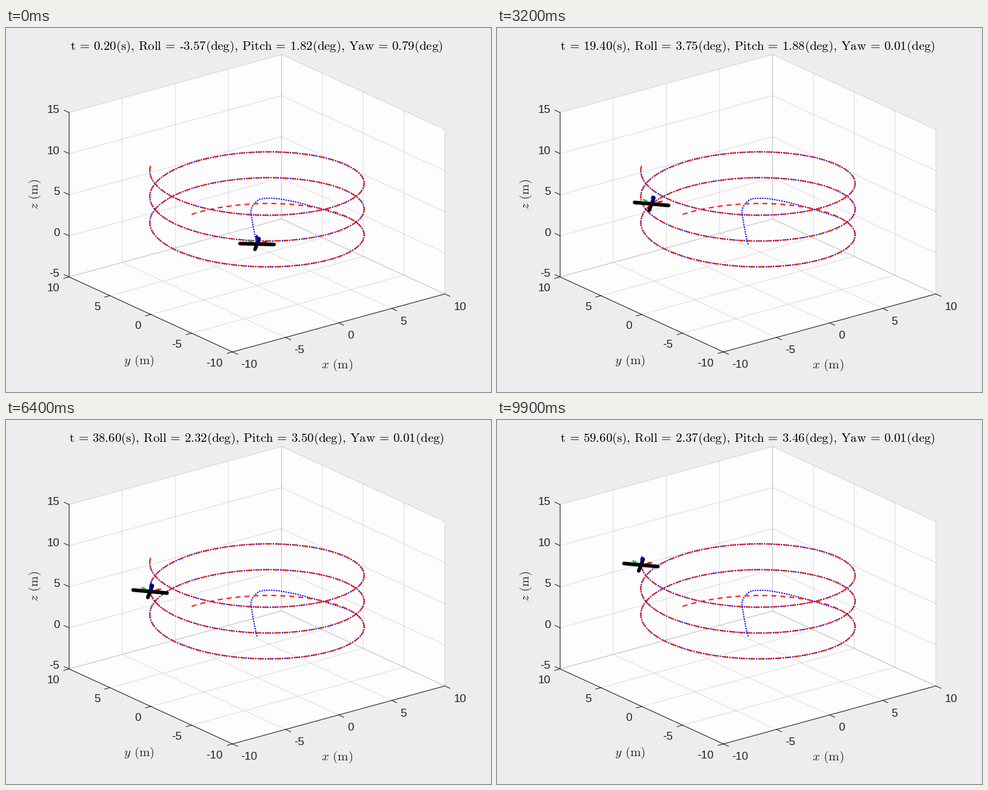
Write a matplotlib script that moves like this. It is 800x600 px and loops after 10 s.

```python
import numpy as np
import matplotlib.pyplot as plt
from matplotlib.animation import FuncAnimation

plt.rcParams.update({"font.family": "Liberation Sans", "mathtext.fontset": "cm"})

W, H, DPI = 800, 600, 100
PX = 72 / DPI
INK = "#262626"
RED, GREEN, BLUE = "#fc1606", "#10d030", "#0404d8"
RADIUS, OMEGA, CLIMB = 8, 0.3, 0.15
TILT = 4.197  # bank angle of the steady turn in degrees

fig = plt.figure(figsize=(W / DPI, H / DPI), dpi=DPI, facecolor="#eeecef")
ax = fig.add_axes([0, 0, 1, 1])
ax.set_xlim(0, W)
ax.set_ylim(H, 0)
ax.axis("off")


def project(p):
    """Orthographic view of world points (..., 3) in stage pixels."""
    x, y, z = np.moveaxis(np.asarray(p, float), -1, 0)
    return np.stack([414 + 17.52 * x - 13.47 * y,
                     356.6 - 4.78 * x - 6.18 * y - 13.55 * z], -1)


def line(points, color, width, **kw):
    xy = project(points)
    return ax.plot(xy[:, 0], xy[:, 1], color=color, lw=width * PX, **kw)[0]


def dashed(points, color, width, on, off):
    """Line with dash lengths in pixels."""
    line(points, color, width, dashes=(on / width, off / width),
         dash_capstyle="butt")


def spline(t, knots, values):
    """Cubic Hermite curve through the knots, held at both ends."""
    knots, values = np.array(knots), np.array(values, float)
    slopes = np.gradient(values, knots, axis=0)
    t = np.clip(t, knots[0], knots[-1])
    i = np.clip(np.searchsorted(knots, t, side="right") - 1, 0, len(knots) - 2)
    h = (knots[i + 1] - knots[i])[..., None]
    s = (t - knots[i])[..., None] / h
    return ((1 + 2 * s) * (1 - s) ** 2 * values[i]
            + s * (1 - s) ** 2 * h * slopes[i]
            + s * s * (3 - 2 * s) * values[i + 1]
            + s * s * (s - 1) * h * slopes[i + 1])


def reference(t):
    t = np.asarray(t, float)
    return np.stack([RADIUS * np.sin(OMEGA * t),
                     RADIUS * np.cos(OMEGA * t), CLIMB * t], -1)


# Take-off from the centre: time, x, y until the helix is reached
TAKEOFF = np.array([
    (0, 0, 0), (0.2, 0.01, 0.01), (0.8, 0.75, 1.2), (1.4, 2.55, 3.9),
    (1.85, 3.85, 5.72), (2.15, 4.7, 6.45), (2.5, 5.63, 6.89),
    (2.8, 6.27, 6.53), (3.4, 7.04, 5.0), (4.0, 7.44, 3.3), (4.9, 7.8, 0.83)])
LAG_T = np.append(TAKEOFF[:, 0], [5.8, 6.8])
LAG = np.vstack([TAKEOFF[:, 1:] - reference(TAKEOFF[:, 0])[:, :2],
                 np.zeros((2, 2))])

# Extra roll, pitch, yaw in degrees while catching up
SWING_T = [0.2, 0.8, 1.4, 2, 2.6, 3.2, 3.8, 4.4, 5, 6.2, 7]
SWING = [(-7.76, 2.07, 0.79), (-29, 16.5, 1.1), (-9, 7, 0.4),
         (19, -8.5, -1.2), (20, -7, -0.6), (8, -3.5, -0.2), (1.5, -1, 0.05),
         (-0.8, 0.2, 0.03), (-0.6, 0.3, 0), (0, 0, 0), (0, 0, 0)]


def position(t):
    p = reference(t)
    p[..., :2] += spline(np.asarray(t, float), LAG_T, LAG)
    return p


def attitude(t):
    a = OMEGA * t
    steady = np.array([TILT * np.cos(a), -TILT * np.sin(a),
                       -0.0075 * np.sin(2 * a)])
    return steady + spline(np.asarray(t, float), SWING_T, SWING)


def rotation(roll, pitch, yaw):
    angles = [roll, pitch, yaw]
    (cr, cp, cy), (sr, sp, sy) = np.cos(angles), np.sin(angles)
    rx = np.array([[1, 0, 0], [0, cr, -sr], [0, sr, cr]])
    ry = np.array([[cp, 0, sp], [0, 1, 0], [-sp, 0, cp]])
    rz = np.array([[cy, -sy, 0], [sy, cy, 0], [0, 0, 1]])
    return rz @ ry @ rx


def draw_box():
    lo, hi, bottom, top = -10, 10, -5, 15
    panes = [
        [(lo, hi, bottom), (hi, hi, bottom), (hi, hi, top), (lo, hi, top)],
        [(hi, lo, bottom), (hi, hi, bottom), (hi, hi, top), (hi, lo, top)],
        [(lo, lo, bottom), (hi, lo, bottom), (hi, hi, bottom), (lo, hi, bottom)],
    ]
    for pane in panes:
        ax.fill(*project(pane).T, color="#fdfcfe", lw=0)

    grid = dict(color=INK, width=1, alpha=0.16)
    for v in range(-10, 11, 5):
        line([(v, lo, bottom), (v, hi, bottom), (v, hi, top)], **grid)
        line([(lo, v, bottom), (hi, v, bottom), (hi, v, top)], **grid)
        z = v + 5
        line([(lo, hi, z), (hi, hi, z), (hi, lo, z)], **grid)

    line([(lo, hi, top), (lo, hi, bottom), (lo, lo, bottom), (hi, lo, bottom)],
         INK, 1.1)
    font = dict(fontsize=13.6, color=INK, va="center_baseline")
    for k, v in enumerate(range(-10, 11, 5)):
        z = v + 5
        line([(lo, hi, z), (lo, hi + 0.62, z)], INK, 1.1)
        line([(lo, v, bottom), (lo - 0.5, v, bottom)], INK, 1.1)
        line([(v, lo, bottom), (v, lo - 0.62, bottom)], INK, 1.1)
        ax.text(88.5, 403.8 - 67.6 * k, z, ha="right", **font)
        ax.text(357 - 67.2 * k, 551.2 - 30.9 * k, v, ha="right", **font)
        ax.text(387.5 + 87.7 * k, 553.2 - 23.6 * k, v, ha="left", **font)

    name = dict(fontsize=15, color=INK, va="baseline", ha="left")
    ax.text(520, 561, r"$x\text{ (m)}$", **name)
    ax.text(194, 554, r"$y\text{ (m)}$", **name)
    ax.text(53, 299, r"$z\text{ (m)}$", rotation=90,
            rotation_mode="anchor", **name)


draw_box()
span = np.linspace(0, 60.2, 3000)
dashed(position(span), BLUE, 2.1, 2.1, 1.9)
dashed(reference(span), RED, 2.1, 8.2, 6.6)

# Vehicle: two crossed arms and its body axes
ARM = 1.28 / np.sqrt(2)
ARMS = [np.array([(ARM, s * ARM, 0), (-ARM, -s * ARM, 0)]) for s in (1, -1)]


def arrow(axis, side):
    axis, side = np.array(axis, float), np.array(side, float)
    return np.array([0 * axis, axis, 0.75 * axis + 0.09 * side, axis,
                     0.75 * axis - 0.09 * side])


ARROWS = [arrow((1, 0, 0), (0, 1, 0)), arrow((0, 1, 0), (1, 0, 0)),
          arrow((0, 0, 1), (1, 0, 0))]
shapes = ARMS + ARROWS
arm_lines = [ax.plot([], [], color="black", lw=6 * PX, zorder=5,
                     solid_capstyle="round")[0] for _ in ARMS]
axis_lines = [ax.plot([], [], color=c, lw=1.8 * PX, zorder=z)[0]
              for c, z in ((RED, 4), (GREEN, 4), (BLUE, 6))]

# Title: Computer Modern advances in em, with hyphens drawn as short bars
EM = 15 / PX
ADVANCE = {}
for chars, width in (("0123456789aog", 0.5), (".,li", 0.278), ("()t", 0.389),
                     ("=", 0.778), (" -", 0.333), ("s", 0.394), ("dh", 0.556),
                     ("ec", 0.444), ("R", 0.736), ("P", 0.681), ("Y", 0.667),
                     ("w", 0.722)):
    ADVANCE.update(dict.fromkeys(chars, width))
BASE = 36
parts = [ax.text(0, BASE, "", fontsize=15, color="black", va="baseline",
                 ha="left") for _ in range(4)]
hyphens = [ax.plot([], [], color="black", lw=1.4 * PX,
                   solid_capstyle="butt")[0] for _ in range(3)]


def text_width(s):
    return EM * sum(ADVANCE[c] for c in s)


def set_title(s):
    x = 413.7 - text_width(s) / 2
    pieces = s.split("-")
    for i, part in enumerate(parts):
        if i >= len(pieces):
            part.set_text("")
            hyphens[i - 1].set_data([], [])
            continue
        if i:
            y = BASE - 0.216 * EM
            hyphens[i - 1].set_data([x + 0.2, x + 0.28 * EM], [y, y])
            x += text_width("-")
        part.set_text(rf"$\text{{{pieces[i]}}}$")
        part.set_x(x - 1)
        x += text_width(pieces[i])


def update(i):
    t = 0.2 + 0.6 * i
    angles = attitude(t)
    turn, centre = rotation(*np.radians(angles)), position(t)
    for artist, shape in zip(arm_lines + axis_lines, shapes):
        artist.set_data(*project(centre + shape @ turn.T).T)
    roll, pitch, yaw = angles
    set_title(f"t = {t:.2f}(s), Roll = {roll:.2f}(deg), "
              f"Pitch = {pitch:.2f}(deg), Yaw = {yaw:.2f}(deg)")
    return arm_lines + axis_lines + parts + hyphens


anim = FuncAnimation(fig, update, frames=100, interval=100, repeat=True,
                     repeat_delay=0, blit=False)
plt.show()
```
